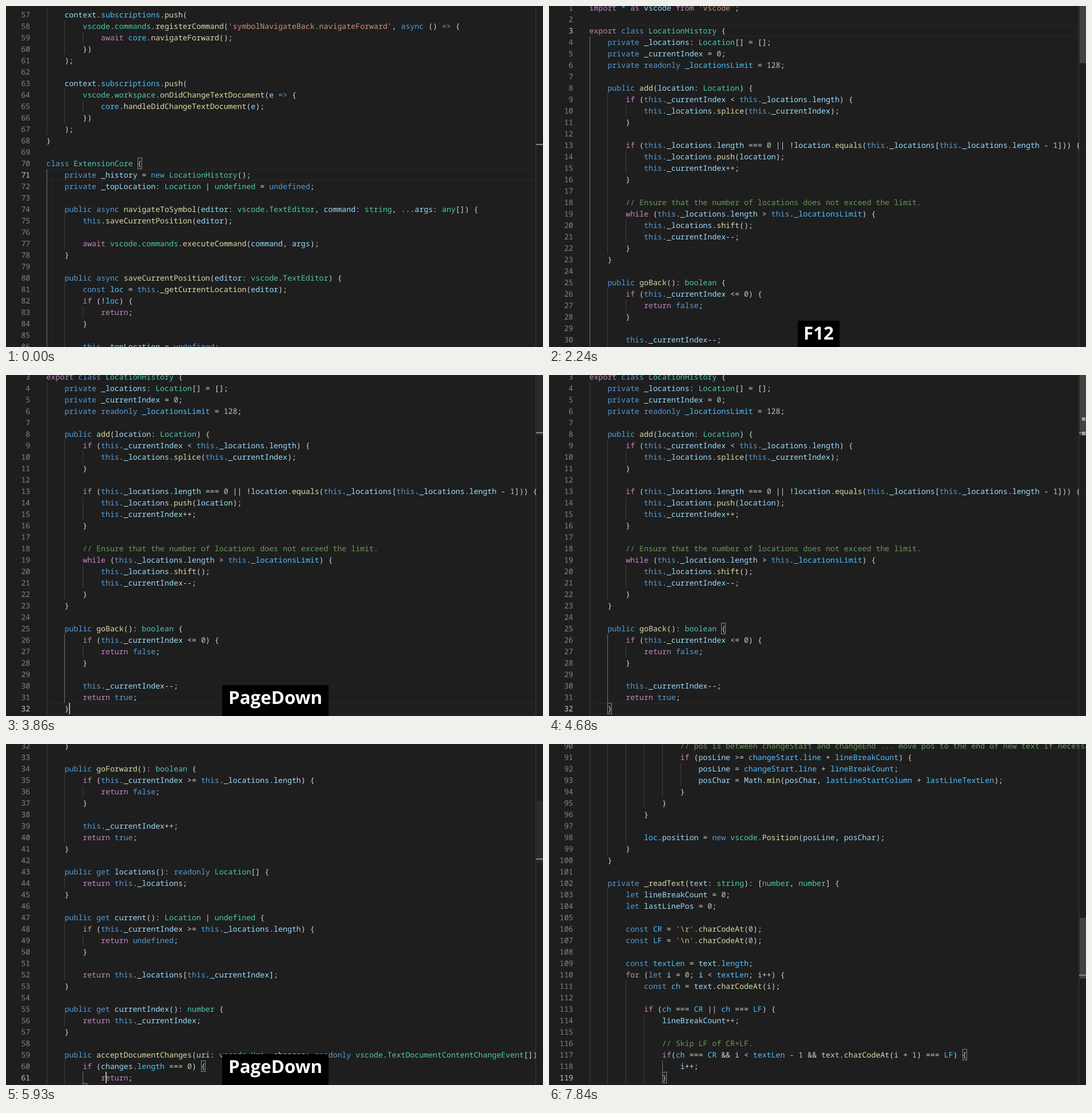
Recreate the animation shown at these times as an HTML page. Size 939 by 596 pixels, loop 8 s.

```html
<!DOCTYPE html>
<html lang="en">
<head>
<meta charset="utf-8">
<title>Code navigation</title>
<style>
html, body { margin: 0; width: 100%; height: 100%; overflow: hidden; background: #1e1e1e; }
#stage { position: relative; width: 939px; height: 596px; overflow: hidden; background: #1e1e1e; color: #d4d4d4;
  font: 13.25px/20px "Noto Sans Mono", "DejaVu Sans Mono", monospace;
  font-variant-ligatures: none; text-rendering: geometricPrecision; }
#stage div, #stage span { position: absolute; white-space: pre; box-sizing: border-box; }
.view { inset: 0; visibility: hidden; }
.num { left: 0; width: 42.3px; text-align: right; color: #858585; }
.num.now { color: #c6c6c6; }
.guide { width: 1px; height: 20.1px; background: #404040; }
.guide.now { background: #707070; }
.row { left: 71px; width: 856px; height: 20px; border: solid #282828; border-width: 1.5px 0; }
.bracket { width: 8px; height: 20px; border: 1px solid #888; background: rgba(0, 100, 0, .1); }
.caret { width: 2px; height: 20px; background: #aeafad; }
.word { height: 20px; background: rgba(234, 92, 0, .33); }
.edge { left: 926px; top: 0; width: 1px; height: 596px; background: #3b3b3b; }
.slider { left: 928px; width: 11px; background: rgba(121, 121, 121, .4); }
.mark { left: 927px; width: 12px; height: 2px; background: #868686; }
.dot { left: 932px; width: 6px; height: 6px; background: #a0a0a0; }
#key { height: 54px; background: #000; color: #fff; text-align: center;
  font: 700 31.3px/44px "Open Sans", "Noto Sans", sans-serif; }
</style>
</head>
<body>
<div id="stage"></div>
<script>
const X0 = 70.6, CHAR = 7.95, ROW = 20.02, LOOP = 8000;

const mainCode = String.raw`
    context.subscriptions.push(
        vscode.commands.registerCommand('symbolNavigateBack.navigateForward', async () => {
            await core.navigateForward();
        })
    );

    context.subscriptions.push(
        vscode.workspace.onDidChangeTextDocument(e => {
            core.handleDidChangeTextDocument(e);
        })
    );
}

class ExtensionCore {
    private _history = new LocationHistory();
    private _topLocation: Location | undefined = undefined;

    public async navigateToSymbol(editor: vscode.TextEditor, command: string, ...args: any[]) {
        this.saveCurrentPosition(editor);

        await vscode.commands.executeCommand(command, args);
    }

    public async saveCurrentPosition(editor: vscode.TextEditor) {
        const loc = this._getCurrentLocation(editor);
        if (!loc) {
            return;
        }

        this._topLocation = undefined;`;

const historyCode = String.raw`
import * as vscode from 'vscode';

export class LocationHistory {
    private _locations: Location[] = [];
    private _currentIndex = 0;
    private readonly _locationsLimit = 128;

    public add(location: Location) {
        if (this._currentIndex < this._locations.length) {
            this._locations.splice(this._currentIndex);
        }

        if (this._locations.length === 0 || !location.equals(this._locations[this._locations.length - 1])) {
            this._locations.push(location);
            this._currentIndex++;
        }

        // Ensure that the number of locations does not exceed the limit.
        while (this._locations.length > this._locationsLimit) {
            this._locations.shift();
            this._currentIndex--;
        }
    }

    public goBack(): boolean {
        if (this._currentIndex <= 0) {
            return false;
        }

        this._currentIndex--;
        return true;
    }

    public goForward(): boolean {
        if (this._currentIndex >= this._locations.length) {
            return false;
        }

        this._currentIndex++;
        return true;
    }

    public get locations(): readonly Location[] {
        return this._locations;
    }

    public get current(): Location | undefined {
        if (this._currentIndex >= this._locations.length) {
            return undefined;
        }

        return this._locations[this._currentIndex];
    }

    public get currentIndex(): number {
        return this._currentIndex;
    }

    public acceptDocumentChanges(uri: vscode.Uri, changes: readonly vscode.TextDocumentContentChangeEvent[]) {
        if (changes.length === 0) {
            return;
        }

        for (const loc of this._locations) {
            if (loc.uri.toString() !== uri.toString()) {
                continue;
            }

            let posLine = loc.position.line;
            let posChar = loc.position.character;

            // Move the position to match the change.
            for (const change of changes) {
                const changeStart = change.range.start;
                const changeEnd = change.range.end;

                const [lineBreakCount, lastLineTextLen] = this._readText(change.text);
                const lastLineStartColumn = (lineBreakCount === 0 ? changeStart.character : 0);

                if (posLine < changeStart.line || posLine === changeStart.line && posChar <= changeStart.character) {
                    // pos is before changeStart ... do nothing.
                } else if (posLine > changeEnd.line || posLine === changeEnd.line && posChar >= changeEnd.character) {
                    // pos is after changeEnd ... shift pos to match the change.
                    posLine += changeStart.line + lineBreakCount - changeEnd.line;

                    if (posLine === changeEnd.line) {
                        posChar += lastLineStartColumn + lastLineTextLen - changeEnd.character;
                    }
                } else {
                    // pos is between changeStart and changeEnd ... move pos to the end of new text if necessary.
                    if (posLine >= changeStart.line + lineBreakCount) {
                        posLine = changeStart.line + lineBreakCount;
                        posChar = Math.min(posChar, lastLineStartColumn + lastLineTextLen);
                    }
                }
            }

            loc.position = new vscode.Position(posLine, posChar);
        }
    }

    private _readText(text: string): [number, number] {
        let lineBreakCount = 0;
        let lastLinePos = 0;

        const CR = '\r'.charCodeAt(0);
        const LF = '\n'.charCodeAt(0);

        const textLen = text.length;
        for (let i = 0; i < textLen; i++) {
            const ch = text.charCodeAt(i);

            if (ch === CR || ch === LF) {
                lineBreakCount++;

                // Skip LF of CR+LF.
                if(ch === CR && i < textLen - 1 && text.charCodeAt(i + 1) === LF) {
                    i++;
                }`;

// Syntax colours
const C = { text: '#d4d4d4', key: '#569cd6', flow: '#c586c0', string: '#ce9178', escape: '#d7ba7d', name: '#9cdcfe',
  fixed: '#4fc1ff', func: '#dcdcaa', type: '#4ec9b0', number: '#b5cea8', note: '#6a9955' };
const words = list => new Set(list.split(' '));
const flow = words('import as from export await if else for while return continue');
const keys = words('class private public async readonly new this const let of get true false => *');
const types = words('string number boolean any commands workspace');
const fixed = words('subscriptions core loc change changeStart changeEnd lastLineTextLen lastLineStartColumn ' +
  'CR LF textLen ch line character range start end _locationsLimit');
const tokenRe = /\/\/.*|'\w[\w.]*'|'|\\\w|[A-Za-z_]\w*|\d+|=>|\s+|[^\w\s'/\\]+/g;

function colour(tok, before, after, n) {
  if (tok.startsWith('//')) return C.note;
  if (tok[0] === "'") return C.string;
  if (tok[0] === '\\') return C.escape;
  if (/^\d/.test(tok)) return C.number;
  if (flow.has(tok)) return C.flow;
  if (keys.has(tok)) return C.key;
  if (!/^\w/.test(tok)) return C.text;
  if (tok === 'undefined') return before.endsWith('| ') ? C.type : C.key;
  if (tok === 'vscode') return n === 1 ? C.name : C.type;
  if (before.endsWith('get ')) return C.name;
  if (after[0] === '(' && !/new $/.test(before)) return C.func;
  if (fixed.has(tok) || (tok === 'lineBreakCount' && n < 100) || (tok === 'text' && before.endsWith('change.')) ||
    (tok === 'length' && /(text|changes)\.$/.test(before))) return C.fixed;
  if (types.has(tok) || (/^[A-Z]/.test(tok) && tok !== 'Math')) return C.type;
  return C.name;
}

// A document is its first line number, its lines and the indent depth of each.
function makeDoc(first, code) {
  const lines = code.slice(1).split('\n');
  const depth = i => lines[i] ? lines[i].search(/\S/) / 4 : null;
  const nearest = (i, step) => {
    while (i >= 0 && i < lines.length && !lines[i]) i += step;
    return depth(i) ?? 0;
  };
  const depths = lines.map((line, i) => {
    if (line) return depth(i);
    const up = nearest(i, -1), down = nearest(i, 1);
    return up === down ? up : Math.min(up, down) + 1;
  });
  return { first, lines, depths };
}

const mainDoc = makeDoc(57, mainCode), historyDoc = makeDoc(1, historyCode);

// top: [line, y]; at: caret [line, column]; guide: active [column, from, to]; pair: lines ending in a lit bracket
const views = [
  { doc: mainDoc, top: [57, 5.2], at: [71, 35], guide: [0, 71, 86], pair: [70], mark: 241 },
  { doc: historyDoc, top: [1, -7], at: [3, 13], guide: [0, 4, 30], pair: [], slider: [0, 100], word: [3, 13, 15] },
  { doc: historyDoc, top: [3, -7], at: [32, 5], guide: [4, 26, 31], pair: [25, 32], slider: [0, 106], mark: 100, dots: [74, 99] },
  { doc: historyDoc, top: [32, -7], at: [61, 13], guide: [8, 61, 61], pair: [60, 62], slider: [100, 207], mark: 200 },
  { doc: historyDoc, top: [61, -7], at: [90, 12], guide: [16, 90, 94], pair: [89], slider: [202, 309], mark: 301 },
  { doc: historyDoc, top: [90, -7], at: [119, 12], guide: [16, 118, 118], pair: [117, 119], slider: [304, 410], mark: 403 }
];

const stage = document.getElementById('stage');

function add(parent, cls, style = {}, text = '', tag = 'div') {
  const el = document.createElement(tag);
  el.className = cls;
  for (const k in style) el.style[k] = typeof style[k] === 'number' ? style[k] + 'px' : style[k];
  el.textContent = text;
  return parent.appendChild(el);
}

const colX = col => Math.round(X0 + col * CHAR);

function build(v) {
  const { doc, top, at, guide } = v;
  const y = n => Math.floor(top[1] + (n - top[0]) * ROW);
  const root = v.root = add(stage, 'view');
  v.parts = { c: [], b: [], s: [], h: [] };
  add(root, 'row', { top: y(at[0]) });
  if (v.word) v.parts.h.push(add(root, 'word', { left: colX(v.word[1]), top: y(v.word[0]), width: v.word[2] * CHAR }));

  doc.lines.forEach((line, i) => {
    const n = doc.first + i, rowY = y(n);
    if (rowY < -20 || rowY > 596) return;
    add(root, n === at[0] ? 'num now' : 'num', { top: rowY }, n);
    for (let col = 0; col < doc.depths[i] * 4; col += 4) {
      const lit = col === guide[0] && n >= guide[1] && n <= guide[2];
      add(root, lit ? 'guide now' : 'guide', { left: colX(col), top: rowY, height: y(n + 1) - rowY });
    }
    for (const m of line.matchAll(tokenRe)) {
      const tok = m[0], col = m.index;
      if (!tok.trim()) continue;
      const tint = colour(tok, line.slice(0, col), line.slice(col + tok.length), n);
      add(root, '', { left: X0 + col * CHAR, top: rowY, color: tint }, tok, 'span');
    }
    if (v.pair.includes(n)) v.parts.b.push(add(root, 'bracket', { left: colX(line.length - 1), top: rowY }));
  });

  v.parts.c.push(add(root, 'caret', { left: colX(at[1]), top: y(at[0]) }));
  add(root, 'edge');
  if (v.slider) v.parts.s.push(add(root, 'slider', { top: v.slider[0], height: v.slider[1] - v.slider[0] }));
  if (v.mark) add(root, 'mark', { top: v.mark });
  for (const d of v.dots || []) v.parts.b.push(add(root, 'dot', { top: d }));
}
views.forEach(build);

const key = add(stage, '');
key.id = 'key';
const keyBox = { F12: [435, 550, 73], PageDown: [378, 542, 186] };

// Time, view, flags (c caret, b brackets, s slider, d dim slider, h word highlight), pressed key
const F = 'F12', P = 'PageDown';
const steps = [
  [0, 0, 'b'], [330, 0, 'bc'], [790, 0, 'b'], [1250, 0, 'bc'], [1710, 0, 'b', F],
  [1780, 1, 'c', F], [1840, 1, 'cdh', F], [1910, 1, 'csh', F], [2100, 1, 'cs', F], [2240, 1, 's', F],
  [2530, 1, 's'], [2810, 1, 'cs'], [3260, 1, 's'], [3790, 1, 'cs', P],
  [3860, 2, 'cd', P], [3930, 2, 'bcs', P], [4330, 2, 'bs', P], [4680, 2, 'bs'], [4890, 2, 'bcs', P],
  [4970, 3, 'bcs', P], [5370, 3, 'bs', P], [5720, 3, 'bs'], [5930, 3, 'bcd', P],
  [6000, 4, 'cd', P], [6060, 4, 'bcs', P], [6460, 4, 'bs', P], [6740, 4, 'bs'], [7020, 4, 'bcs', P],
  [7090, 5, 'bcs', P], [7490, 5, 'bs', P], [7840, 5, 'bs']
];

function show([, index, flags, label]) {
  views.forEach((v, i) => { v.root.style.visibility = i === index ? 'visible' : 'hidden'; });
  const { parts } = views[index];
  for (const k in parts) {
    const level = flags.includes(k) ? 1 : k === 's' && flags.includes('d') ? .35 : 0;
    for (const el of parts[k]) el.style.opacity = level;
  }
  key.style.display = label ? 'block' : 'none';
  if (label) {
    const [left, top, width] = keyBox[label];
    Object.assign(key.style, { left: left + 'px', top: top + 'px', width: width + 'px' });
    key.textContent = label;
  }
}

const start = performance.now();
let shown = null;
function tick() {
  const t = (performance.now() - start) % LOOP;
  const step = steps.findLast(s => s[0] <= t) || steps[0];
  if (step !== shown) show(shown = step);
  requestAnimationFrame(tick);
}
tick();
</script>
</body>
</html>
```
